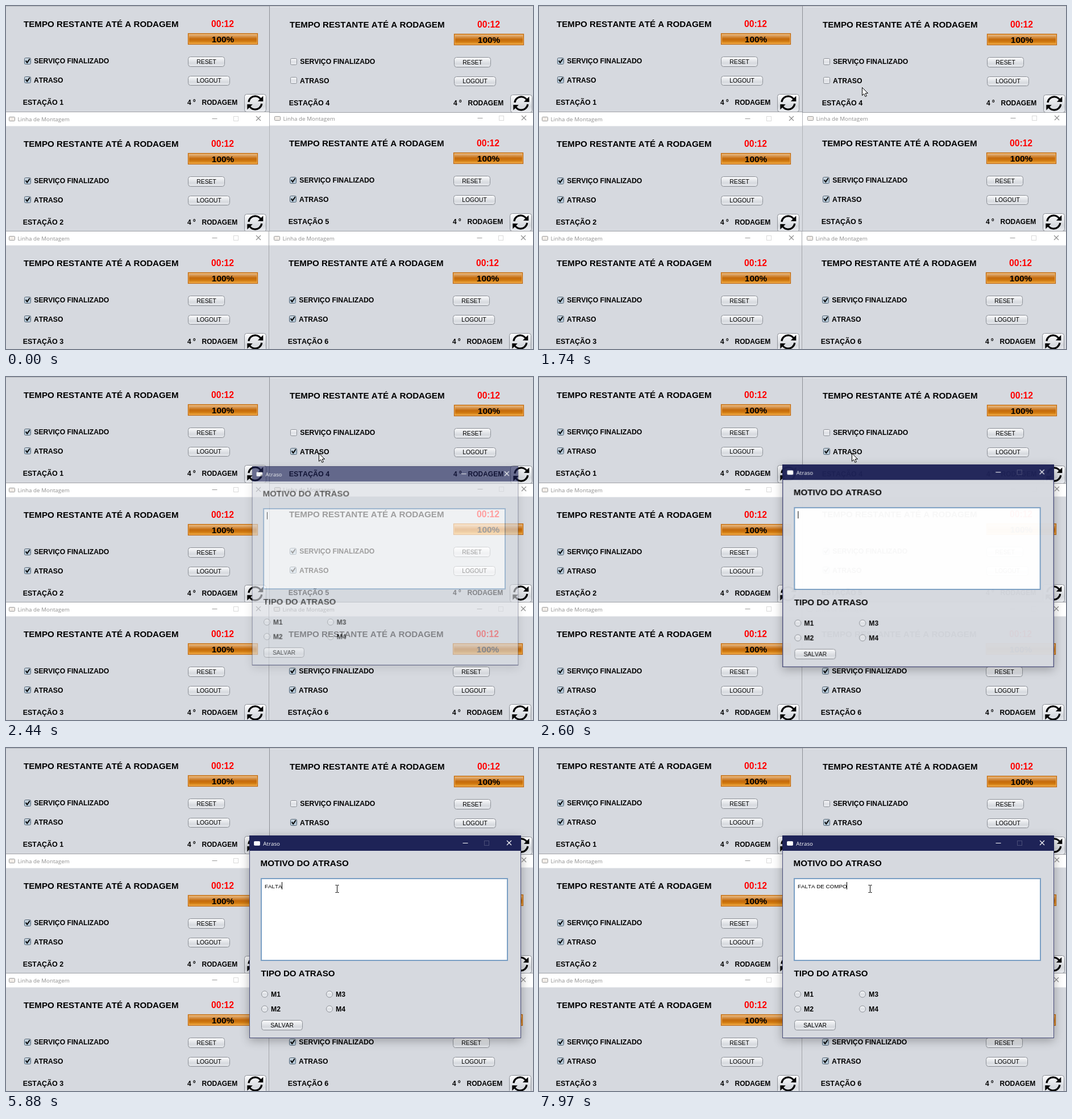
Write an HTML page with a canvas that moves like this. It is 927 px wide and 604 px high and loops after 8000 ms.

```html
<!DOCTYPE html>
<html lang="pt-BR">
<head>
<meta charset="utf-8">
<title>Linha de Montagem</title>
<style>
html, body { margin: 0; width: 927px; height: 604px; overflow: hidden; background: #d6d9df; }
canvas { display: block; }
</style>
</head>
<body>
<canvas id="stage" width="927" height="604"></canvas>
<script>
const LOOP = 8000, BG = '#d6d9df';
const SANS = '"Liberation Sans", Arial, sans-serif';
const UI = '"Open Sans", "Noto Sans", sans-serif';
const main = document.getElementById('stage').getContext('2d');
const sheet = document.createElement('canvas');
sheet.width = 478;
sheet.height = 357;
const DLG = { x: 428, y: 154, w: 478, h: 357 };
let g = main;

// ---------- helpers ----------
function rect(x, y, w, h, fill) {
  g.fillStyle = fill;
  g.fillRect(x, y, w, h);
}

function text(str, x, cy, size, { bold = true, color = '#000', align = 'left', family = SANS } = {}) {
  g.font = `${bold ? 'bold ' : ''}${size}px ${family}`;
  g.fontKerning = 'none';
  g.textAlign = align;
  g.fillStyle = color;
  g.fillText(str, x, Math.round(cy + size * 0.358));
}

function grad(y, h, ...colors) {
  const s = g.createLinearGradient(0, y, 0, y + h);
  colors.forEach((c, i) => s.addColorStop(i / (colors.length - 1), c));
  return s;
}

function box(x, y, w, h, r, fill, line) {
  g.beginPath();
  g.roundRect(x + 0.5, y + 0.5, w - 1, h - 1, r);
  g.fillStyle = fill;
  g.fill();
  g.strokeStyle = line;
  g.lineWidth = 1;
  g.stroke();
}

function lines(color, width, ...segs) {
  g.strokeStyle = color;
  g.lineWidth = width;
  g.beginPath();
  for (const [x1, y1, x2, y2] of segs) {
    g.moveTo(x1, y1);
    g.lineTo(x2, y2);
  }
  g.stroke();
}

function poly(points, fill) {
  g.beginPath();
  points.forEach(([x, y]) => g.lineTo(x, y));
  g.closePath();
  g.fillStyle = fill;
  g.fill();
}

// ---------- widgets ----------
function button(x, y, w, h, label) {
  rect(x + 2, y + h, w - 4, 1, '#cacdd3');
  box(x, y, w, h, 4, grad(y, h, '#fdfdfe', '#e9ebee', '#d6d9de', '#eef0f4'), '#8c9097');
  if (label) text(label, x + w / 2, y + h / 2 + 0.2, 10.3, { bold: false, align: 'center' });
}

function checkbox(x, y, on, hover) {
  const fill = on ? grad(y, 12, '#dfe7ee', '#a9bccb', '#c4d6e4') : grad(y, 12, '#fcfcfd', '#dfe1e6', '#eceef2');
  box(x, y, 12, 12, 2, fill, on ? '#4c5f70' : hover ? '#6c7178' : '#8c9097');
  if (!on) return;
  g.beginPath();
  g.moveTo(x + 2.8, y + 5.4);
  g.lineTo(x + 5.2, y + 8.8);
  g.lineTo(x + 9.8, y + 2);
  g.strokeStyle = '#000';
  g.lineWidth = 1.9;
  g.stroke();
}

function progress(x, y) {
  rect(x - 0.5, y - 0.5, 124, 21, '#d9c3ab');
  rect(x, y, 123, 20, '#b9640f');
  rect(x + 1, y + 1, 121, 18, '#eda64a');
  rect(x + 2, y + 2, 119, 16, grad(y + 2, 16, '#e3b684', '#d58f43', '#c56a0b', '#cf780f', '#eca33a'));
  text('100%', x + 61.5, y + 10.4, 15.4, { align: 'center' });
}

function refresh(x, y) {
  button(x, y, 39, 32);
  g.save();
  g.translate(x + 19.3, y + 15.5);
  for (let i = 0; i < 2; i++) {
    g.beginPath();
    g.arc(0, 0, 11.6, Math.PI * 1.04, Math.PI * 1.8);
    g.strokeStyle = '#000';
    g.lineWidth = 3.1;
    g.stroke();
    poly([[14, -12], [14, -2.4], [4.5, -2.8]], '#000');
    g.rotate(Math.PI);
  }
  g.restore();
}

function appIcon(x, y, line, fill) {
  box(x, y, 11, 8, 1, fill, line);
}

function controls(x, y, min, max, close) {
  lines(min, 1, [x - 4.5, y + 0.5, x + 4.5, y + 0.5]);
  g.strokeStyle = max;
  g.strokeRect(x + 33.5, y - 3.5, 8, 8);
  lines(close, 1.1, [x + 73, y - 4, x + 81, y + 4], [x + 81, y - 4, x + 73, y + 4]);
}

// ---------- station window ----------
function station(n, ox, oy, clip, done, late, hover) {
  const [cx, cy, cw, ch] = clip;
  g.save();
  g.beginPath();
  g.rect(cx, cy, cw, ch);
  g.clip();
  rect(cx, cy, cw, ch, BG);
  g.translate(ox, oy);
  if (oy > 100) {
    rect(-6, -25, 480, 25.5, '#fff');
    appIcon(5, -16, '#9b9b9b', '#f1ece7');
    text('Linha de Montagem', 20.5, -12, 9.8, { bold: false, color: '#8f8f8f', family: UI });
    controls(367, -13, '#9a9a9a', '#dadada', '#8c8c8c');
  }
  text('TEMPO RESTANTE ATÉ A RODAGEM', 31, 32, 15.15);
  text('00:12', 381, 31.6, 15.7, { color: '#f00', align: 'center' });
  progress(320, 48);
  checkbox(32, 91, done);
  text('SERVIÇO FINALIZADO', 49.3, 97, 12.2);
  checkbox(32, 124, late, hover);
  text('ATRASO', 49, 131, 12.2);
  button(320, 89, 65, 18, 'RESET');
  button(320, 123, 74, 17, 'LOGOUT');
  text('ESTAÇÃO ' + n, 29.7, 169.5, 12.5);
  text('4 º', 319, 170, 12);
  text('RODAGEM', 344.5, 170, 12);
  refresh(419, 155);
  g.restore();
}

function desktop(late, hover) {
  station(1, 0, 0, [0, 0, 463, 187], true, true);
  station(2, 0, 211, [0, 187, 463, 210], true, true);
  station(5, 467, 210, [463, 187, 464, 210], true, true);
  station(3, 0, 421, [0, 397, 463, 207], true, true);
  station(6, 466, 421, [462, 397, 465, 207], true, true);
  station(4, 468, 1, [464, 0, 463, 188], false, late, hover);
  rect(0, 0, 927, 1, '#b4b6bb');
  rect(464, 1, 463, 1, '#eceef1');
  rect(0, 186, 463, 1, '#9fa1a6');
  rect(464, 187, 463, 1, '#9fa1a6');
  rect(0, 396, 927, 1, '#9fa1a6');
  rect(463, 0, 1, 188, '#8d9096');
  rect(463, 188, 1, 208, '#b0b2b7');
  rect(462, 397, 1, 207, '#a3a5aa');
}

// ---------- delay dialog ----------
function radio(x, y, label) {
  g.beginPath();
  g.arc(x, y, 5.6, 0, Math.PI * 2);
  g.fillStyle = grad(y - 6, 12, '#fcfcfd', '#dcdfe4', '#eceef2');
  g.fill();
  g.strokeStyle = '#8c9097';
  g.lineWidth = 1;
  g.stroke();
  text(label, x + 11, y + 0.5, 12.2);
}

function drawDialog(typed, caret) {
  g = sheet.getContext('2d');
  g.save();
  g.translate(-DLG.x, -DLG.y);
  rect(DLG.x, DLG.y, DLG.w, DLG.h, '#474b78');
  rect(429, 181, 476, 329, BG);
  rect(428, 154, 478, 27, '#1e2357');
  appIcon(436, 164, '#dfe1ea', '#fff');
  text('Atraso', 452.3, 168, 9.8, { bold: false, color: '#fff', family: UI });
  controls(808, 167, '#fff', '#4a4e78', '#fff');
  text('MOTIVO DO ATRASO', 447.5, 203, 15.2);
  rect(448, 229, 435, 146, '#7a9fc4');
  rect(450, 231, 431, 142, '#fff');
  text(typed, 455, 243.2, 9.8, { bold: false });
  if (caret) rect(Math.floor(455 + g.measureText(typed).width), 236, 1, 13, '#000');
  text('TIPO DO ATRASO', 448.5, 396.8, 15.1);
  radio(455, 433.5, 'M1');
  radio(569, 433.5, 'M3');
  radio(455, 459.5, 'M2');
  radio(569, 459.5, 'M4');
  button(449, 479, 73, 18, 'SALVAR');
  g.restore();
  g = main;
}

function showDialog(alpha) {
  const s = 0.95 + 0.05 * alpha, w = DLG.w * s, h = DLG.h * s;
  const x = DLG.x + (DLG.w - w) / 2, y = DLG.y + (DLG.h - h) / 2;
  g.save();
  g.globalAlpha = alpha;
  // the shadow falls only outside the window
  g.save();
  g.beginPath();
  g.rect(0, 0, 927, 604);
  g.rect(x, y, w, h);
  g.clip('evenodd');
  g.shadowColor = `rgba(0,0,0,${0.3 * alpha})`;
  g.shadowBlur = 16;
  g.shadowOffsetY = 4;
  rect(x, y, w, h, '#000');
  g.restore();
  g.drawImage(sheet, x, y, w, h);
  g.restore();
}

// ---------- pointer ----------
const arrow = [[0, 0], [0, 14], [3.2, 11], [5.4, 16], [7.8, 15], [5.6, 10.2], [10, 10]];
function drawArrow(x, y) {
  poly(arrow.map(([a, b]) => [x + 0.5 + a, y + 0.5 + b]), '#fff');
  g.strokeStyle = '#000';
  g.lineWidth = 1;
  g.stroke();
}

function drawBeam(x, y) {
  lines('#000', 1, [x + 0.5, y - 6, x + 0.5, y + 6],
    [x - 2.5, y - 6.5, x, y - 6.5], [x + 1, y - 6.5, x + 3.5, y - 6.5],
    [x - 2.5, y + 6.5, x, y + 6.5], [x + 1, y + 6.5, x + 3.5, y + 6.5]);
}

// first step, last step, number of steps, end point, easing power
const moves = [
  [70, 810, 11, 608, 187, 1.6],
  [890, 1120, 4, 582, 163, 1.5],
  [1440, 1740, 5, 568, 143, 1],
  [1815, 2050, 4, 550, 134, 1.4],
  [2670, 2980, 5, 582, 248, 1.4]
];
function pointer(t) {
  if (t < 70) return null;
  let x = 914, y = 592;
  for (const [from, to, n, ex, ey, pow] of moves) {
    if (t < from) break;
    const step = Math.min(n, Math.floor((t - from) / (to - from) * (n - 1) + 0.01) + 1);
    const e = 1 - Math.pow(1 - step / n, pow);
    x += (ex - x) * e;
    y += (ey - y) * e;
  }
  return [Math.round(x), Math.round(y)];
}

// ---------- timeline ----------
const PHRASE = 'FALTA DE COMPO';
const keys = [4630, 4930, 5250, 5480, 5880, 6410, 6660, 6810, 6960, 7190, 7360, 7510, 7740, 7970];
const fade = [[2680, 1], [2600, 0.97], [2515, 0.86], [2435, 0.62], [2360, 0.25]];

function draw(t) {
  const pos = pointer(t);
  const alpha = (fade.find(([at]) => t >= at) || [0, 0])[1];
  const hover = t >= 1815 && t < 2670;
  desktop(t >= 2200, hover);
  if (alpha) {
    const typed = PHRASE.slice(0, keys.filter(k => t >= k).length);
    const caret = t < 2905 || (t >= 3380 && t < 3840) || t >= 4310;
    drawDialog(typed, caret);
    showDialog(alpha);
  }
  if (pos) (pos[1] > 230 && t > 2670 ? drawBeam : drawArrow)(...pos);
}

function frame() {
  draw(performance.now() % LOOP);
  requestAnimationFrame(frame);
}
frame();
</script>
</body>
</html>
```
